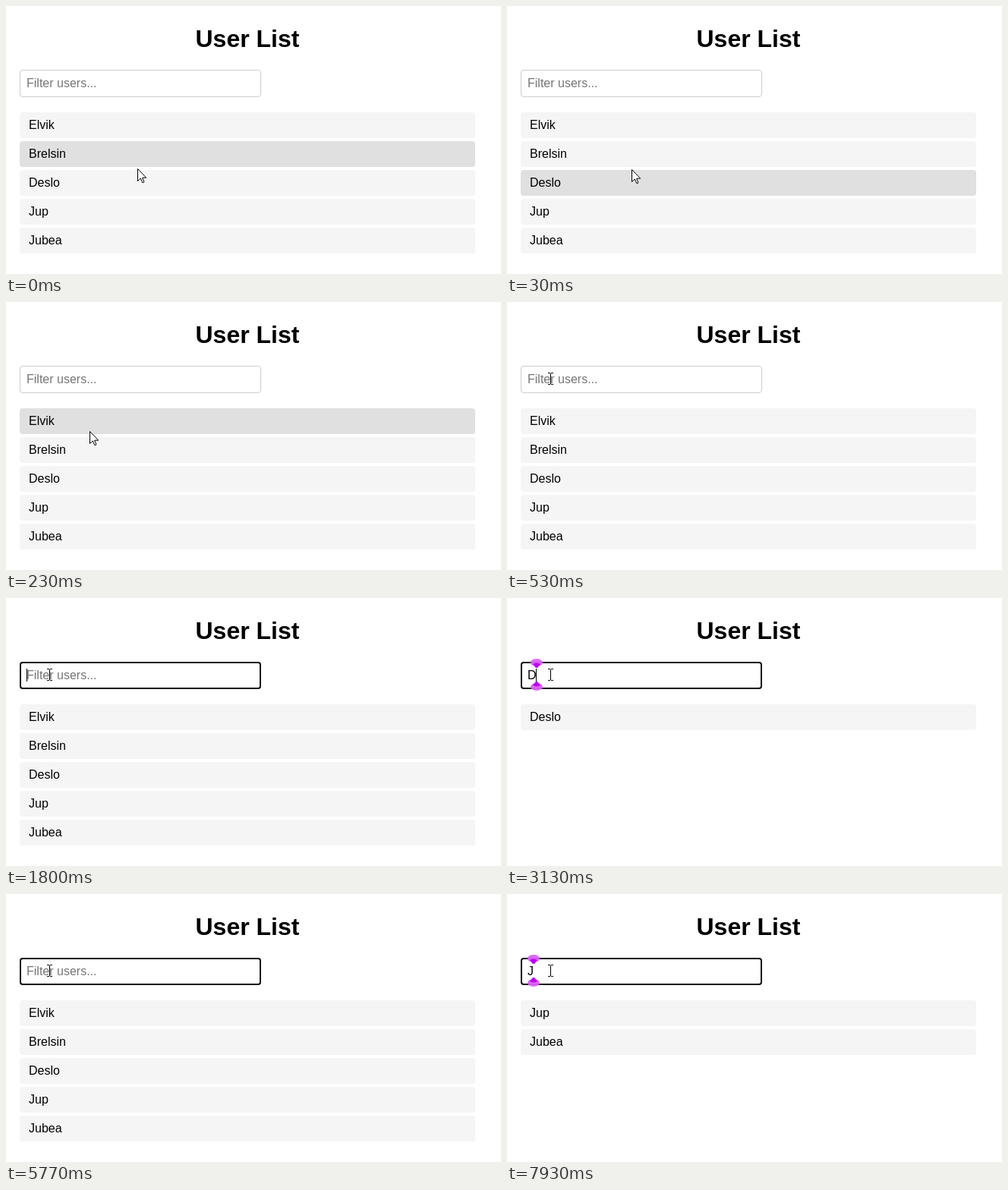
Animation, 652 px wide and 353 px high, one loop 8 s. Source, as an HTML page:

```html
<!DOCTYPE html>
<html lang="en">
<head>
<meta charset="utf-8">
<title>User List</title>
<style>
  html, body { margin: 0; width: 100%; height: 100%; overflow: hidden; background: #fff; }
  svg { display: block; }
  text { font: 16px "Liberation Sans", Arial, sans-serif; }
  .title { font-size: 32px; font-weight: bold; }
  .hint { fill: #757575; }
</style>
</head>
<body>
<svg width="652" height="353" viewBox="0 0 652 353">
  <text class="title" x="249.5" y="54">User List</text>
  <rect id="border" x="18.5" y="84.5" width="317" height="35" rx="3.5" fill="#fff" stroke="#ccc"/>
  <rect id="focusRing" x="19" y="85" width="316" height="34" rx="3" fill="none" stroke="#101010" stroke-width="2"/>
  <text id="field" x="27" y="107"></text>
  <g id="rows"></g>
  <g id="markers">
    <g id="marker">
      <ellipse cx="0" cy="85" rx="8" ry="5" fill="#dc62f8" opacity=".94"/>
      <path d="M-5 87Q0 84 5 87L1 92H-1Z" fill="#be00f5"/>
    </g>
    <use href="#marker" transform="matrix(1 0 0 -1 0 202)"/>
  </g>
  <rect id="caret" y="93" width="1" height="17"/>
  <path id="arrow" d="M.5 .5V16.5L4.3 13 6.8 18.7 9 17.8 6.6 12.2H11.7Z" fill="#fff" stroke="#000"/>
  <path id="beam" d="M-3 -7.5H0M1 -7.5H4M.5 -7V7M-3 7.5H0M1 7.5H4" fill="none" stroke="#000"/>
</svg>
<script>
const DURATION = 8000;
const users = ["Elvik", "Brelsin", "Deslo", "Jup", "Jubea"];
const caretToggles = [730, 1270, 1800, 2600, 3130, 3630, 4200, 4700, 5230, 5770, 6330, 6870, 7430, 7930];
// Pointer stops: [step, x, y, easing power]
const stops = [[0, 173, 214, 1], [1, 164, 215, 1], [6, 119, 181, 1], [16, 57, 101, 1.4]];

const el = Object.fromEntries([...document.querySelectorAll("[id]")].map(e => [e.id, e]));
const show = (node, on) => node.setAttribute("visibility", on ? "visible" : "hidden");
const moveTo = (node, x, y) => node.setAttribute("transform", `translate(${x} ${y})`);
const between = (t, from, to) => t >= from && t < to;

function pointerAt(t) {
  const step = Math.min(16, Math.floor((t + 4) / 33.34));
  const i = Math.max(1, stops.findIndex(s => s[0] >= step));
  const [s0, x0, y0] = stops[i - 1], [s1, x1, y1, power] = stops[i];
  const p = 1 - (1 - (step - s0) / (s1 - s0)) ** power;
  return { x: Math.round(x0 + (x1 - x0) * p), y: Math.round(y0 + (y1 - y0) * p), step };
}

function hoveredRow({ y, step }) {
  if (step === 0) return 1;
  const offset = y + 1 - 140;
  return offset >= 0 && offset % 38 < 34 ? Math.floor(offset / 38) : -1;
}

function typedText(t) {
  if (between(t, 2070, 3670)) return "D";
  return t >= 6370 ? "J" : "";
}

function drawRows(query, hovered) {
  el.rows.innerHTML = users.filter(name => name.includes(query)).map((name, i) => `
    <rect x="18" y="${140 + 38 * i}" width="600" height="34" rx="4" fill="${i === hovered ? "#e0e0e0" : "#f5f5f5"}"/>
    <text x="30" y="${162 + 38 * i}">${name}</text>`).join("");
}

let lastRows;
function draw(t) {
  const pointer = pointerAt(t), query = typedText(t), hovered = hoveredRow(pointer);
  const rowsKey = query + hovered;
  if (rowsKey !== lastRows) drawRows(query, hovered);
  lastRows = rowsKey;

  el.field.textContent = query || "Filter users...";
  el.field.setAttribute("class", query ? "" : "hint");
  show(el.focusRing, t >= 730);

  const caretX = { "": 27, D: 38, J: 35 }[query];
  el.caret.setAttribute("x", caretX);
  show(el.caret, caretToggles.filter(time => time <= t).length % 2);
  moveTo(el.markers, caretX + (query === "D" ? 1 : 0), 0);
  show(el.markers, between(t, 2100, 3700) || t >= 6400);

  const overField = pointer.y < 120;
  show(el.arrow, !overField);
  show(el.beam, overField);
  moveTo(overField ? el.beam : el.arrow, pointer.x, pointer.y);
}

const start = performance.now();
function frame() {
  draw((performance.now() - start) % DURATION);
  requestAnimationFrame(frame);
}
frame();
</script>
</body>
</html>
```
